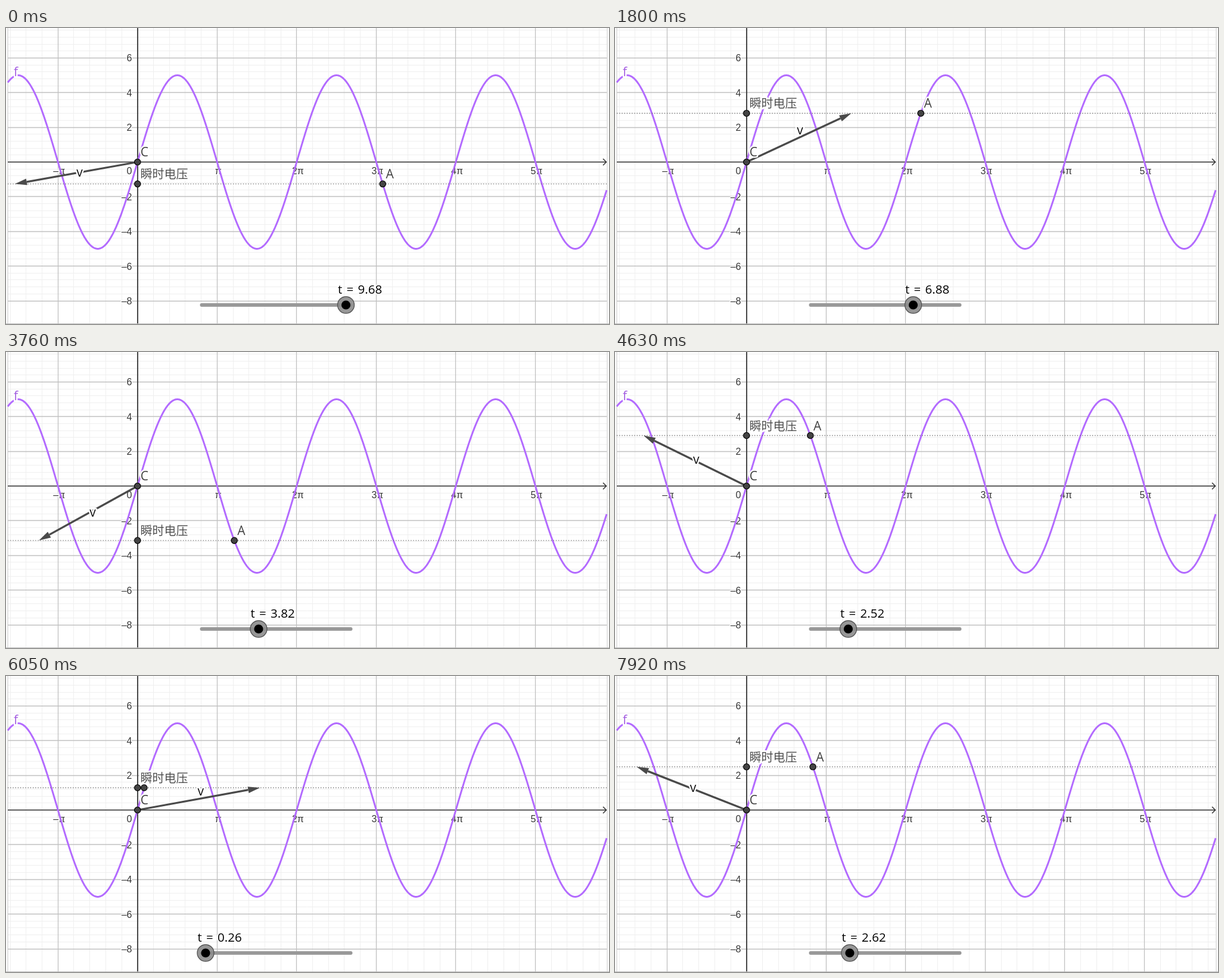
Write an HTML page with a canvas that moves like this. It is 1012 by 498 pixels and loops after 8000 ms.

```html
<!DOCTYPE html>
<html lang="zh">
<head>
<meta charset="utf-8">
<title>瞬时电压</title>
<style>
html, body { margin: 0; width: 100%; height: 100%; overflow: hidden; background: #fff; }
canvas { display: block; }
</style>
</head>
<body>
<canvas id="c" width="1012" height="498"></canvas>
<script>
const ctx = document.getElementById('c').getContext('2d');
const LOOP = 8000;
const OX = 220.75, OY = 225.5;         // origin
const PI_W = 133.55, UX = PI_W / Math.PI, UY = 29.19;
const LEFT = 3, RIGHT = 1008.5, BOTTOM = 497;
const SANS = '"Liberation Sans", Arial, sans-serif';
const LABEL = '"Open Sans", "Noto Sans", sans-serif';
const CJK = '"Noto Sans CJK SC", "Noto Sans CJK", sans-serif';

// runs of steps: first time, last time, count
const runs = [
  [60, 840, 14], [890, 1690, 14], [1750, 2510, 15], [2560, 3320, 14], [3430, 4230, 15],
  [4300, 5080, 15], [5130, 5880, 14], [5950, 6740, 15], [6790, 7580, 15], [7650, 7920, 6]
];
const times = [0];
for (const [a, b, n] of runs) {
  for (let i = 0; i < n; i++) {
    const lead = i > 0 && i < n - 1 ? 13 : 0;
    times.push(a + (b - a) * i / (n - 1) - lead);
  }
}

// slider value by step
const keys = [
  [0, 9.68], [14, 8.44], [28, 7.14], [30, 6.88], [44, 5.66], [64, 3.82], [72, 3.1],
  [87, 1.84], [93, 1.22], [107, 0], [116, 0.76], [131, 2.09], [137, 2.62]
];

function valueAt(ms) {
  let step = 0;
  while (step + 1 < times.length && times[step + 1] <= ms) step++;
  let k = 0;
  while (k < keys.length - 2 && keys[k + 1][0] <= step) k++;
  const [s0, v0] = keys[k], [s1, v1] = keys[k + 1];
  const v = v0 + (v1 - v0) * (step - s0) / (s1 - s0);
  return Math.round(v * 50) / 50;
}

function line(x1, y1, x2, y2, color, width) {
  ctx.strokeStyle = color;
  ctx.lineWidth = width;
  ctx.beginPath();
  ctx.moveTo(x1, y1);
  ctx.lineTo(x2, y2);
  ctx.stroke();
}

function disc(x, y, r, fill, stroke, width) {
  ctx.beginPath();
  ctx.arc(x, y, r, 0, Math.PI * 2);
  ctx.fillStyle = fill;
  ctx.fill();
  if (stroke) {
    ctx.strokeStyle = stroke;
    ctx.lineWidth = width;
    ctx.stroke();
  }
}

function label(text, x, y, font, color, halo, align = 'left') {
  ctx.font = font;
  ctx.textAlign = align;
  ctx.strokeStyle = '#fff';
  ctx.lineWidth = halo;
  ctx.lineJoin = 'round';
  ctx.strokeText(text, x, y);
  ctx.fillStyle = color;
  ctx.fillText(text, x, y);
}

const crisp = v => Math.floor(v) + 0.5;

function grid() {
  for (let i = -8; i < 30; i++) {
    const x = crisp(OX + i * PI_W / 5);
    if (i % 5) line(x, 0, x, BOTTOM, '#efefef', 1);
  }
  for (let i = -23; i < 20; i++) {
    const y = crisp(OY + i * UY * 0.4);
    if (i % 5) line(LEFT, y, RIGHT, y, '#efefef', 1);
  }
  for (let i = -1; i < 6; i++) {
    const x = crisp(OX + i * PI_W);
    line(x, 0, x, BOTTOM, '#c0c0c0', 1.3);
  }
  for (let i = -3; i < 5; i++) {
    const y = crisp(OY + i * 2 * UY);
    line(LEFT, y, RIGHT, y, '#c0c0c0', 1.3);
  }
  line(3, 0, 3, BOTTOM, '#c8c8c8', 1);
  line(1009, 0, 1009, BOTTOM, '#c8c8c8', 1);
  line(0, 497.5, 1012, 497.5, '#bdbdbd', 1);
}

function axes() {
  line(LEFT, OY, RIGHT - 1, OY, '#333', 1.5);
  line(221, 0, 221, BOTTOM, '#222', 1.6);
  ctx.beginPath();
  ctx.moveTo(1002, OY - 5.5);
  ctx.lineTo(1007.5, OY);
  ctx.lineTo(1002, OY + 5.5);
  ctx.strokeStyle = '#333';
  ctx.lineWidth = 1.5;
  ctx.stroke();

  const font = '16px ' + SANS;
  for (let n = -8; n <= 6; n += 2) {
    if (n) label(n < 0 ? '–' + -n : '' + n, 211.5, OY - n * UY + 6, font, '#333', 3, 'right');
  }
  label('0', 211.5, 246, font, '#333', 3, 'right');
  for (let n = -1; n < 6; n++) {
    const text = (n < 0 ? '–' : n > 1 ? n : '') + 'π';
    if (n) label(text, OX + n * PI_W + 2, 246, font, '#333', 3, 'center');
  }
}

function curve() {
  ctx.beginPath();
  for (let x = LEFT; x <= RIGHT; x++) ctx.lineTo(x, OY - 5 * UY * Math.sin((x - OX) / UX));
  ctx.strokeStyle = '#b36bff';
  ctx.lineWidth = 3;
  ctx.lineJoin = 'round';
  ctx.stroke();
}

// draws the arrow and returns the place of its label
function vector(dx, dy) {
  const len = Math.hypot(dx, dy), ux = dx / len, uy = dy / len;
  const tx = OX + dx, ty = OY + dy;
  const bx = tx - ux * 20, by = ty - uy * 20;
  line(OX, OY, bx, by, '#4a4a4a', 3.3);
  ctx.beginPath();
  ctx.moveTo(tx, ty);
  ctx.lineTo(bx - uy * 5.5, by + ux * 5.5);
  ctx.lineTo(bx + uy * 5.5, by - ux * 5.5);
  ctx.closePath();
  ctx.fillStyle = '#4a4a4a';
  ctx.fill();
  return [OX + dx / 2 + 4.5 + 6 * uy, OY + dy / 2 - 6.8 - 5.8 * ux];
}

function slider(t) {
  const x = 328.5 + t * 25;
  ctx.lineCap = 'round';
  line(328.5, 466, 578.5, 466, '#999', 6);
  ctx.lineCap = 'butt';
  disc(x, 466, 14, 'rgba(140,140,140,0.9)', '#555', 1.4);
  disc(x, 466, 7.6, '#000');
  ctx.wordSpacing = '2px';
  label('t = ' + t.toFixed(2), x - 13.5, 447, '20.5px ' + LABEL, '#000', 4);
  ctx.wordSpacing = '0px';
}

function draw(ms) {
  const t = valueAt(ms);
  const dy = -5 * UY * Math.sin(t), py = OY + dy;
  const ax = OX + t * UX;
  const font = '21px ' + LABEL;

  ctx.fillStyle = '#fff';
  ctx.fillRect(0, 0, 1012, 498);
  grid();
  axes();
  curve();

  ctx.setLineDash([1.3, 2.9]);
  line(LEFT, py, RIGHT, py, '#6c6c6c', 1.4);
  ctx.setLineDash([]);

  const [vx, vy] = vector(5 * UX * Math.cos(t), dy);
  label('v', vx, vy + 7, font, '#111', 5, 'center');
  label('f', 13, 81, font, '#a35ee0', 5);
  label('A', ax + 5.2, py - 9, font, '#444', 5);
  label('瞬时电压', OX + 4.8, py - 9, '20px ' + CJK, '#505050', 6);
  label('C', OX + 5, OY - 9.5, font, '#444', 5);

  for (const [x, y] of [[ax, py], [OX, py], [OX, OY]]) disc(x, y, 5.2, '#444', '#000', 1.2);
  slider(t);
}

const start = performance.now();
function tick() {
  draw((performance.now() - start) % LOOP);
  requestAnimationFrame(tick);
}
tick();
</script>
</body>
</html>
```
